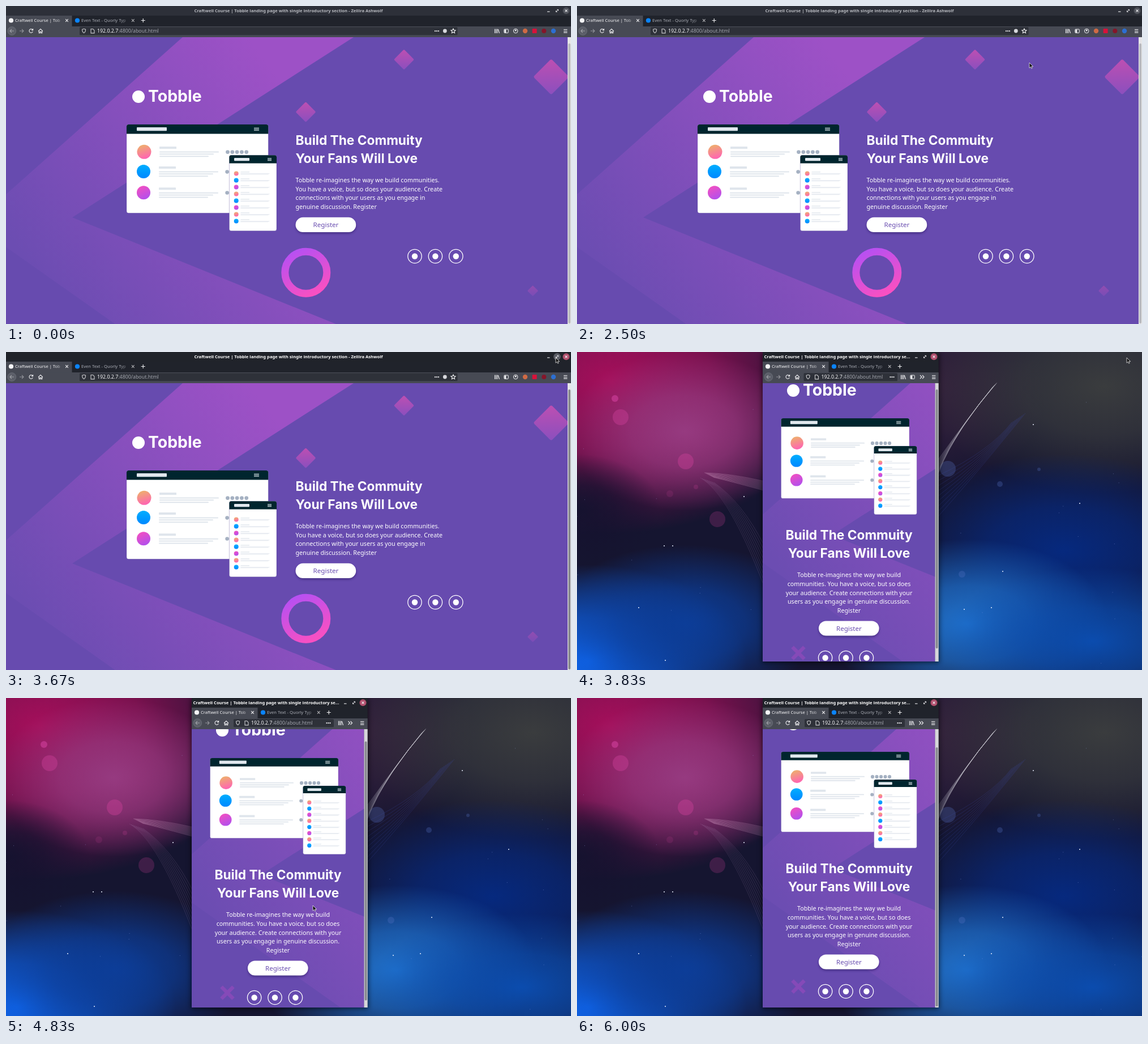
These frames come from a looping animation (998x561 px, 6.99 s). An HTML page:

```html
<!DOCTYPE html>
<html lang="en">
<head>
<meta charset="utf-8">
<title>Landing page preview</title>
<style>
html, body { margin: 0; width: 100%; height: 100%; overflow: hidden; background: #674baf; }
svg { display: block; width: 100%; height: 100%; }
text { font-family: "Noto Sans", sans-serif; white-space: pre; }
.head { font-family: Inter, sans-serif; font-weight: 700; fill: #fff; }
.body { font-size: 10.7px; fill: #fff; }
.btn { font-size: 11.55px; fill: #674baf; text-anchor: middle; }
.ln { fill: none; stroke: #f2f2f4; stroke-width: 1.1; }
</style>
</head>
<body>
<svg id="stage" viewBox="0 0 998 561" preserveAspectRatio="none"></svg>
<script>
const LOOP = 6990, TICK = 1000 / 6;
const rect = (x, y, w, h, fill, r = 0, more = '') =>
  `<rect x="${x}" y="${y}" width="${w}" height="${h}" rx="${r}" fill="${fill}" ${more}/>`;
const disc = (x, y, r, fill, more = '') => `<circle cx="${x}" cy="${y}" r="${r}" fill="${fill}" ${more}/>`;
const line = (d, more = '') => `<path class="ln" d="${d}" ${more}/>`;
const text = (x, y, str, more = '') => `<text x="${x}" y="${y}" ${more}>${str}</text>`;
const group = (inner, more = '') => `<g ${more}>${inner}</g>`;
const shift = (x, y, inner) => group(inner, `transform="translate(${x} ${y})"`);
const grad = (id, a, b, more = 'x1="0" y1="0" x2="0" y2="1"') =>
  `<linearGradient id="${id}" ${more}><stop offset="0" stop-color="${a}"/><stop offset="1" stop-color="${b}"/></linearGradient>`;
const fade = (id, color, x) =>
  `<linearGradient id="${id}" gradientUnits="userSpaceOnUse" x1="${x}" y1="0" x2="${x + 18}" y2="0">
   <stop offset="0" stop-color="${color}"/><stop offset="1" stop-color="${color}" stop-opacity="0"/></linearGradient>`;

let seed = 11;
const rand = () => (seed = (seed * 16807) % 2147483647) / 2147483647;

const defs = `<defs>
${grad('warm', '#eeb06c', '#ff62b4', 'x1=".3" y1="0" x2=".6" y2="1"')}
${grad('blue', '#00aeff', '#0088ff')}
${grad('pink', '#f44fc0', '#b050ee', 'x1=".2" y1="0" x2=".7" y2="1"')}
${grad('gem', '#bd4fb2', '#8b4fbe', 'x1="0" y1="0" x2="1" y2="1"')}
${grad('ring', '#b750f2', '#f850c2', 'x1=".2" y1="0" x2=".7" y2="1"')}
${grad('band', '#6c4db2', '#9d51c6', 'gradientUnits="userSpaceOnUse" x1="0" y1="400" x2="440" y2="70"')}
${fade('tabA', '#f4f4f6', 86)}${fade('tabB', '#a9acb4', 202)}
<clipPath id="view"><rect x="328" y="55" width="304.5" height="490.5"/></clipPath>
<filter id="soft" x="-20%" y="-40%" width="140%" height="200%"><feGaussianBlur stdDeviation="2"/></filter>
<filter id="wide" x="-10%" y="-10%" width="120%" height="120%"><feGaussianBlur stdDeviation="4"/></filter>
</defs>`;

// ---------- page parts ----------
const bands = '<path fill="url(#band)" d="M312 55H614L117 373L828 660H333L-30 404V359Z"/>';

const burger = (x, y, w, gap) => [0, 1, 2].map(i => rect(x, y + i * gap, w, 1, '#dfe7ec')).join('');

function cardRow(x, y, cy, r, fill) {
  const bars = [105, 96, 87].map((w, i) => rect(x, y + 8.4 + i * 3.9, w, 2, '#dfe5ec', 1)).join('');
  return disc(244 - (12.5 - r) * 2, cy, r, `url(#${fill})`) + rect(x, y, 30, 4, '#dfe5ec', .6) + bars;
}

function phoneRow(i) {
  const y = 295.5 + i * 12;
  return disc(406.7, y, 4, `url(#${['warm', 'blue', 'pink'][i % 3]})`) +
    rect(414.5, y - 3.3, 15.5, 1.5, '#e3e8ee') +
    `<path fill="#e6eaf0" d="M414.5 ${y - .3}h52l-4 2h-48z"/>`;
}

const art = (() => {
  let s = rect(213, 209, 250.3, 156.3, '#fff', 3.5, 'stroke="#40308a" stroke-opacity=".35" stroke-width=".6"');
  s += '<path fill="#00252e" d="M213 225.5v-13a3.5 3.5 0 0 1 3.5-3.5h243.3a3.5 3.5 0 0 1 3.5 3.5v13z"/>';
  s += rect(231, 214, 53, 6.3, '#e1e8ee', 1) + burger(438, 214.7, 9, 2.1);
  s += cardRow(271, 248, 257.3, 12.5, 'warm') + cardRow(270, 283, 292, 12, 'blue') + cardRow(270, 320.3, 329.3, 12, 'pink');
  for (let i = 0; i < 5; i++) s += disc(391.5 + i * 8.3, 257.6, 3.4, '#a5b1c2');
  s += disc(390.6, 292.6, 3.3, '#a5b1c2') + disc(390.6, 329.5, 3.3, '#a5b1c2');
  s += rect(394.4, 263.3, 83.6, 133.4, '#fff', 3.5, 'stroke="#40308a" stroke-opacity=".45" stroke-width=".7"');
  s += '<path fill="#00252e" d="M394.4 277.6v-11a3.5 3.5 0 0 1 3.5-3.4h76.6a3.5 3.5 0 0 1 3.5 3.4v11z"/>';
  s += rect(403, 268, 27, 5.2, '#e1e8ee', 1) + burger(462, 268.3, 7, 1.9);
  for (let i = 0; i < 8; i++) s += phoneRow(i);
  return s;
})();

const logo = disc(234, 160, 11, '#fff') + text(251, 169.3, 'Tobble', 'class="head" font-size="28.4"');
const button = rect(512, 376, 106, 25, '#1d1050', 13, 'opacity=".5" filter="url(#soft)"') +
  rect(511.5, 372.8, 106.7, 26.2, '#fff', 13.1) + text(565, 390, 'Register', 'class="btn"');
const social = [722, 758.4, 794.8].map(x =>
  disc(x, 441.5, 12.2, 'none', 'stroke="#fff" stroke-width="1.3"') + disc(x, 441.5, 5.2, '#fff')).join('');

function copy(x, y, lines, gap, more) {
  return lines.map((s, i) => text(x, y + i * gap, s, more)).join('');
}
const title = ['Build The Commuity', 'Your Fans Will Love'];

function gem(x, y, half, opacity = 1) {
  const a = half * 1.49;
  return rect(x - a / 2, y - a / 2, a, a, 'url(#gem)', a * .07, `transform="rotate(45 ${x} ${y})" opacity="${opacity}"`);
}

const widePage = rect(0, 55, 998, 506, '#674baf') + bands +
  gem(703, 94.5, 17) + gem(963, 125, 30) + gem(529.5, 187, 17) + gem(930.5, 502.5, 9, .5) +
  disc(529.8, 470.2, 37, 'none', 'stroke="url(#ring)" stroke-width="13"') +
  logo + art +
  copy(511.5, 244.6, title, 32, 'class="head" font-size="22.7"') +
  copy(511.5, 311.2, ['Tobble re-imagines the way we build communities.',
    'You have a voice, but so does your audience. Create',
    'connections with your users as you engage in',
    'genuine discussion. Register'], 15.55, 'class="body"') +
  button + social +
  rect(992, 55, 6, 506, '#e6e6e8') + rect(993.2, 66, 3.8, 494, '#b9babd', 1.9, 'id="thumbW"');

const smallPage = rect(328, 55, 304.5, 491, '#674baf') + group(
  group(shift(333, -50, bands) +
    '<path d="M380.5 520.5l21 21m0-21l-21 21" stroke="#8f4abb" stroke-width="6.5" opacity=".75"/>' +
    shift(148, -92, logo) +
    group(art, 'transform="translate(167.9 -72.1) scale(.9045)"') +
    copy(480.5, 330.6, title, 32, 'class="head" font-size="22.7" text-anchor="middle"') +
    copy(480.5, 397.4, ['Tobble re-imagines the way we build',
      'communities. You have a voice, but so does',
      'your audience. Create connections with your',
      'users as you engage in genuine discussion.',
      'Register'], 15.55, 'class="body" text-anchor="middle"') +
    shift(-84.6, 101.6, button) + shift(-283.4, 98, social), 'id="scroll"'), 'clip-path="url(#view)"') +
  rect(632.5, 55, 6.2, 491, '#d6d6d9') + rect(633.7, 66, 3.8, 457, '#86888d', 1.9, 'id="thumbS"');

// ---------- browser frame ----------
const cross = (x, y, r, more) => line(`M${x - r} ${y - r}l${2 * r} ${2 * r}m0 ${-2 * r}l${-2 * r} ${2 * r}`, more);
const menu = x => line(`M${x - 3} 41.5h6.4m-6.4 2.7h6.4m-6.4 2.7h6.4`);
const books = x => line(`M${x - 3.5} 40.5v7.5m2.2-7.5v7.5m2.2-7.5v7.5m1.3-7l2.3 7`);
const panel = x => rect(x - 3.6, 41, 7.4, 6.4, 'none', 1, 'stroke="#f2f2f4"') + rect(x - 3, 41.5, 2.8, 5.4, '#f2f2f4');
const more = x => line(`M${x - 3} 41l3 3l-3 3m4-6l3 3l-3 3`);
const dots = x => [-3, 0, 3].map(d => disc(x + d, 44.2, 1.1, '#f2f2f4')).join('');

function tabs(width) {
  return rect(0, 17, width, 19.5, '#20232b') + rect(0, 36, width, 19, '#474a54') + rect(0, 17, 116.5, 19.5, '#474a54') +
    disc(9, 25.5, 4.1, '#f4f4f6') + disc(126, 25.5, 4.1, '#0a84ff') +
    text(16, 28.2, 'Craftwell Course | Tob', 'font-size="7.6" fill="url(#tabA)"') +
    text(133, 28.2, 'Even Text - Quorly Typ', 'font-size="7.6" fill="url(#tabB)"') +
    cross(107.5, 25.5, 2.3) + cross(224.3, 25.5, 2.3, 'opacity=".7"') + line('M238.7 25.5h7m-3.5-3.5v7') +
    disc(10.3, 44, 7.4, '#5b5e68', 'stroke="#767983" stroke-width=".6"') +
    line('M14 44h-7m3-3l-3 3l3 3', 'opacity=".45"') + line('M24 44h7m-3-3l3 3l-3 3', 'opacity=".45"') +
    line('M47 42a3.3 3.3 0 1 0 .3 3.2M47.6 40v2.7h-2.7') +
    line('M57 44.3l4-3.7l4 3.7M58.3 44v3.7h1.8v-2.3h1.8v2.3h1.8V44');
}

function address(x, end) {
  return rect(x, 37.2, end - x, 14, '#2e3139', 1.5) +
    line(`M${x + 4.6} 41.2l3-.9l3 .9c0 3.4-.8 5.2-3 6.4c-2.2-1.2-3-3-3-6.4z`, 'opacity=".8"') +
    line(`M${x + 20} 40.5h3.6l2.4 2.4v5h-6z`, 'opacity=".8"') +
    text(x + 31, 47.2, '192.0.2.7<tspan fill="#a2a5ad">:4800/about.html</tspan>', 'font-size="8.8" fill="#f6f6f8"');
}

const caption = 'Craftwell Course | Tobble landing page with single introductory ';
const capStyle = 'font-size="7.6" font-weight="700"';
const controls = x => line(`M${x - 33.5} 10h4.5`) +
  line(`M${x - 18} 10.3l4-4m-2.2 0h2.2v2.2m-4-.4v2.2h2.2`, 'style="stroke-width:.9"');

const wideWindow = widePage + rect(0, 0, 998, 17, '#2d3039', 0, 'id="bar"') + tabs(998) +
  text(499, 11, caption + 'section - Zellira Ashwolf', `${capStyle} id="cap" text-anchor="middle"`) +
  disc(973.5, 8.3, 6.3, '#5a5d66', 'id="hover"') + controls(989.5) +
  disc(989.5, 8.3, 6, '#50535c', 'id="close"') + cross(989.5, 8.3, 2) +
  address(130, 797.5) + dots(761) + disc(775.3, 44, 3.4, '#d8d9dd') +
  line('M790 40l1.2 2.6l2.9.3l-2.2 1.9l.7 2.9l-2.6-1.5l-2.6 1.5l.7-2.9l-2.2-1.9l2.9-.3z') +
  books(867) + panel(883.5) + disc(900.2, 44, 3.8, 'none', 'stroke="#f2f2f4"') + disc(900.2, 43, 1.5, '#f2f2f4') +
  disc(917, 44, 4.2, '#cf6a45') + rect(929.6, 40, 8, 8, '#d8123a', 1) + disc(950.3, 44, 4, '#85152a') +
  disc(967, 44, 4.2, '#2c6fd2') + menu(988);

const smallWindow = rect(327, 2, 313, 546, '#000', 0, 'opacity=".6" filter="url(#wide)"') + smallPage +
  rect(328, 0, 310.7, 17.2, '#20232a') + shift(328, 0, tabs(310.7)) +
  text(330.5, 11, caption + 'se...', `${capStyle} fill="#fff"`) +
  controls(630.5) + disc(630.5, 8.3, 6, '#b04f6d') + cross(630.5, 8.3, 2) +
  group(address(400.5, 566) + dots(556.5) + books(576) + panel(592.5) + more(609) + menu(630), 'id="toolsA"') +
  group(address(402, 579) + dots(569.5) + books(591) + more(607.5) + menu(629), 'id="toolsB"');

// ---------- desktop backdrop ----------
function backdrop() {
  const glows = [
    [60, 50, 400, 270, '#a50f5b'], [190, 140, 210, 140, '#963a80'], [0, 280, 150, 100, '#15122f'],
    [20, 545, 280, 170, '#0f66ee'], [190, 480, 240, 140, '#0c3d98'], [640, 60, 190, 180, '#33203c'],
    [930, 60, 320, 190, '#3a3c3e'], [860, 350, 300, 170, '#06297e'], [690, 480, 250, 150, '#2072ce'], [910, 510, 270, 130, '#0b4cae']];
  let s = rect(0, 0, 998, 561, '#151530');
  glows.forEach(([x, y, rx, ry, c], i) => {
    s += `<radialGradient id="glow${i}"><stop offset="0" stop-color="${c}"/><stop offset=".45" stop-color="${c}" stop-opacity=".7"/>
      <stop offset="1" stop-color="${c}" stop-opacity="0"/></radialGradient>
      <ellipse cx="${x}" cy="${y}" rx="${rx}" ry="${ry}" fill="url(#glow${i})"/>`;
  });
  for (const [x, y, r, a] of [[77, 115, 14, .4], [67, 82, 6, .6], [192, 193, 14, .4], [248, 295, 14, .22], [210, 238, 4, .2], [164, 250, 6, .15]])
    s += disc(x, y, r, '#d0409c', `opacity="${a}"`);
  for (const [x, y, r] of [[816, 207, 3], [747, 233, 5], [680, 392, 6], [655, 206, 14]])
    s += disc(x, y, r, '#5a76c8', 'opacity=".28"');
  for (let i = 0; i < 9; i++) {
    s += line(`M${225 + i * 2} ${213 + i}Q${270 + i} ${214 + i * 2} 330 ${228 + i * 2}`, 'style="stroke:#e6b4d6;stroke-width:.7" opacity=".4"');
    s += line(`M${218 + i * 3} ${222 + i}Q${268 + i * 3} ${250 + i * 2} 330 ${412 - i * 9}`, 'style="stroke:#b894c4;stroke-width:.7" opacity=".25"');
    s += line(`M638 ${214 - i * 3}Q${668 + i * 3} ${138 - i * 3} ${742 - i} ${54 + i}`, 'style="stroke:#dcdce6;stroke-width:.8" opacity=".35"');
    s += line(`M638 ${290 - i * 9}Q${705 + i * 3} ${215 - i * 5} ${792 - i * 3} ${108 + i * 2}`, 'style="stroke:#3c4aa4;stroke-width:.8" opacity=".35"');
  }
  for (const [x, y] of [[154, 342], [169, 342], [109, 451], [295, 255], [888, 267], [752, 387], [732, 451], [684, 454], [806, 128], [156, 544]])
    s += disc(x, y, 1, '#e8f0ff');
  for (let i = 0; i < 36; i++) s += disc(rand() * 998, 80 + rand() * 470, .5, '#a8b8ff', 'opacity=".5"');
  return s;
}

const stage = document.getElementById('stage');
stage.innerHTML = defs + group(wideWindow, 'id="wideWin"') + group(backdrop() + smallWindow, 'id="smallWin"') +
  '<path id="arrow" d="M0 0V9.3L2.2 7.3L3.7 10.3L5.1 9.6L3.7 6.7H6.7Z" fill="#111" stroke="#fff" stroke-width=".7"/>' +
  '<g id="beam"><path d="M-1.8 0h3.6M0 0v8M-1.8 8h3.6" stroke="#fff" stroke-width="1.8"/>' +
  '<path d="M-1.5 0h3M0 0v8M-1.5 8h3" stroke="#222" stroke-width=".8"/></g>';

const el = {};
stage.querySelectorAll('[id]').forEach(n => el[n.id] = n);
const show = (node, on) => node.setAttribute('display', on ? 'inline' : 'none');
const set = (node, name, value) => node.setAttribute(name, value);

// pointer stops: tick, x, y
const stops = [[9, 950, 255], [11, 605, 252], [12, 605, 252], [15, 799, 100], [17, 915, 36], [19, 962, 13],
  [20, 971, 10], [23, 971, 10], [24, 940, 36], [27, 566, 345], [28, 543, 362], [29, 542, 366], [32, 542, 366], [35, 980, 335]];

function pointer(tick) {
  const i = stops.findIndex(s => s[0] >= tick);
  if (i < 0 || tick < stops[0][0]) return null;
  const b = stops[i], a = stops[Math.max(0, i - 1)];
  const k = b === a ? 1 : (tick - a[0]) / (b[0] - a[0]);
  return [a[1] + (b[1] - a[1]) * k, a[2] + (b[2] - a[2]) * k];
}

function draw(ms) {
  const tick = Math.floor((ms + 4) / TICK);
  const small = tick >= 23, active = tick >= 22, late = tick >= 25;
  show(el.wideWin, !small);
  show(el.smallWin, small);
  set(el.bar, 'fill', active ? '#20232a' : '#2d3039');
  set(el.cap, 'fill', active ? '#fff' : '#b9bbc1');
  set(el.close, 'fill', active ? '#b04f6d' : '#50535c');
  set(el.thumbW, 'fill', active ? '#86888d' : '#b9babd');
  show(el.hover, tick >= 20);
  show(el.toolsA, !late);
  show(el.toolsB, late);

  const scroll = 22 * Math.min(1, Math.max(0, (tick - 28) / 2));
  set(el.scroll, 'transform', `translate(0 ${-scroll})`);
  set(el.thumbS, 'y', 66 + scroll * .96);

  const p = pointer(tick), beam = tick === 28;
  show(el.arrow, p && !beam);
  show(el.beam, p && beam);
  if (p) set(beam ? el.beam : el.arrow, 'transform', `translate(${p[0]} ${p[1]})`);
}

const start = performance.now();
function loop() {
  draw((performance.now() - start) % LOOP);
  requestAnimationFrame(loop);
}
loop();
</script>
</body>
</html>
```
